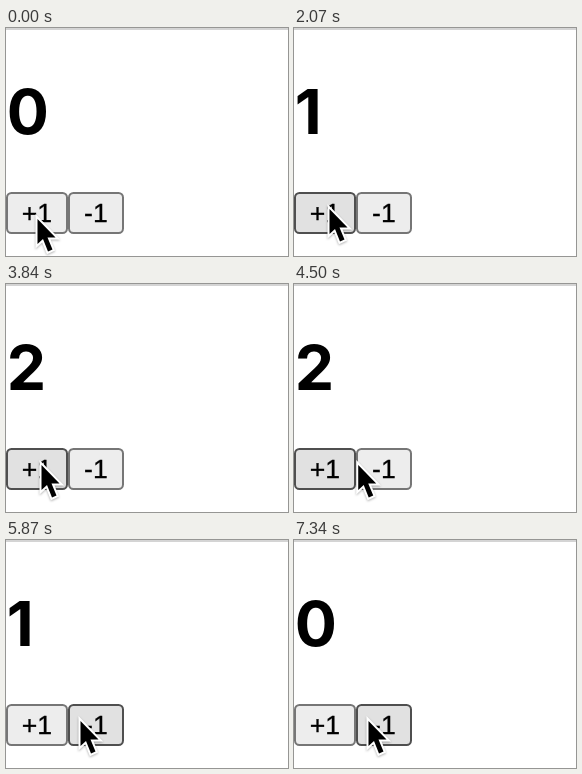
Write an HTML page that moves like this. It is 282x228 px and loops after 8000 ms.

```html
<!DOCTYPE html>
<html lang="en">
<head>
<meta charset="utf-8">
<title>Counter</title>
<style>
  html, body { margin: 0; width: 100%; height: 100%; overflow: hidden; background: #fff; }
  svg { display: block; }
  #count { font: 700 62.5px Inter, sans-serif; }
  .button rect { fill: #ededed; stroke: #767676; stroke-width: 2; }
  .button.hover rect { fill: #e1e1e1; stroke: #4f4f4f; }
  .button.press rect { fill: #f4f4f4; stroke: #8d8d8d; }
  .button text { font: 26.67px "Liberation Sans", Arial, sans-serif; stroke: #000; stroke-width: .3; }
  #cursor { filter: drop-shadow(0 1px 1px rgba(0, 0, 0, .3)); }
</style>
</head>
<body>
<svg width="282" height="228" viewBox="0 0 282 228">
  <rect width="282" height="2" fill="#d4d4d4"/>
  <text id="count" x="0.8" y="106">0</text>
  <g id="plus" class="button">
    <rect x="1" y="165" width="60" height="40" rx="4.5"/>
    <text x="15.8" y="193.6">+1</text>
  </g>
  <g id="minus" class="button">
    <rect x="63" y="165" width="54" height="40" rx="4.5"/>
    <text x="78" y="193.6">-1</text>
  </g>
  <path id="cursor" d="M0 0V25L5.5 20L10.5 32.5L15 30.5L10 18.5H18Z"
        stroke="#fff" stroke-width="4" paint-order="stroke"/>
</svg>
<script>
const LOOP = 8000, FRAME = 100 / 3;
const [count, plus, minus, cursor] =
  ['count', 'plus', 'minus', 'cursor'].map(id => document.getElementById(id));

// Progress of a move sampled at 30 frames per second; the first step is visible at start.
const steps = (t, start, n) =>
  Math.max(0, Math.min(1, (Math.floor((t - start) / FRAME + 0.02) + 1) / n));

const pressed = (t, start) => t >= start && t < start + 100;

function setState(button, hover, press) {
  button.setAttribute('class', 'button' + (press ? ' press' : hover ? ' hover' : ''));
}

function draw(now) {
  const t = now % LOOP;
  count.textContent = (t >= 2070) + (t >= 3840) - (t >= 5870) - (t >= 7340);

  setState(plus, t >= 500 && t < 4535, pressed(t, 970) || pressed(t, 2740));
  setState(minus, t >= 4535, pressed(t, 6240));

  const settle = steps(t, 500, 3);
  const across = 1 - (1 - steps(t, 4400, 15)) ** 4.3;
  const x = 31.5 + 4 * settle + 39 * across;
  const y = 191 - 10 * settle;
  cursor.setAttribute('transform', `translate(${x} ${y})`);

  requestAnimationFrame(draw);
}
requestAnimationFrame(draw);
</script>
</body>
</html>
```
